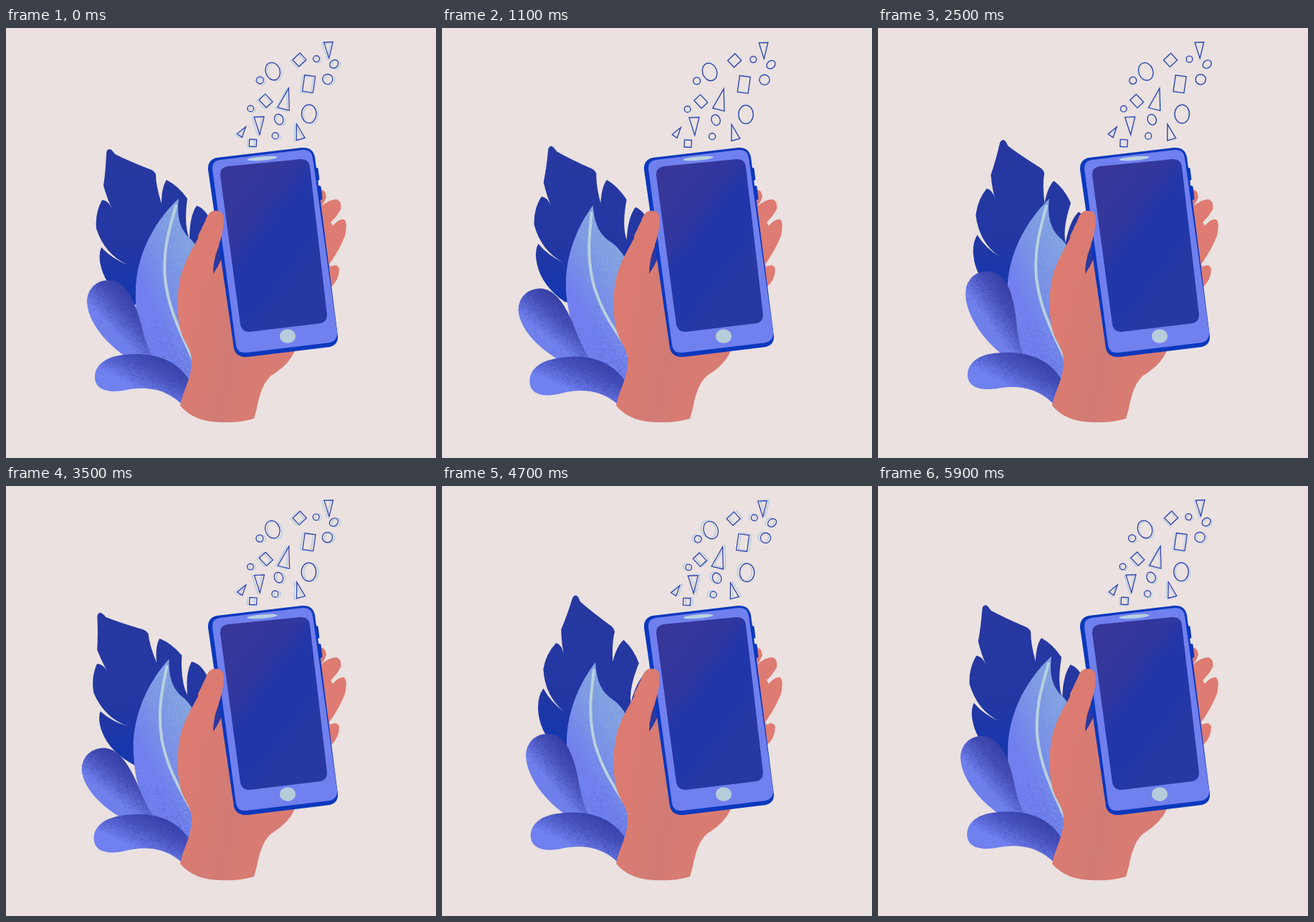
Write an HTML page that moves like this. It is 600x600 px and loops after 6 s.

```html
<!DOCTYPE html>
<html lang="en">
<head>
<meta charset="utf-8">
<title>Hand with phone</title>
<style>
  html, body { margin: 0; width: 100%; height: 100%; overflow: hidden; background: #eae1e0; }
  svg { display: block; width: 100vw; height: 100vh; }
</style>
</head>
<body>
<svg viewBox="0 0 600 600">
  <defs>
    <linearGradient id="darkFill" gradientUnits="userSpaceOnUse" x1="185" y1="180" x2="205" y2="390">
      <stop stop-color="#2738a0"/><stop offset=".6" stop-color="#2337a3"/><stop offset="1" stop-color="#1037b3"/>
    </linearGradient>
    <linearGradient id="bladeFill" gradientUnits="userSpaceOnUse" x1="262" y1="330" x2="192" y2="360">
      <stop stop-color="#7f9fe1"/><stop offset=".5" stop-color="#7991e6"/><stop offset="1" stop-color="#7180ee"/>
    </linearGradient>
    <linearGradient id="bulbFill" gradientUnits="userSpaceOnUse" x1="172" y1="370" x2="122" y2="417">
      <stop stop-color="#3840a6"/><stop offset=".3" stop-color="#4650b8"/><stop offset=".75" stop-color="#6f7fec"/>
    </linearGradient>
    <linearGradient id="budFill" gradientUnits="userSpaceOnUse" x1="208" y1="452" x2="175" y2="515">
      <stop stop-color="#3741a8"/><stop offset=".35" stop-color="#4853bd"/><stop offset=".8" stop-color="#6f80ef"/>
    </linearGradient>
    <linearGradient id="skin" gradientUnits="userSpaceOnUse" x1="240" y1="400" x2="350" y2="420">
      <stop stop-color="#dd7b71"/><stop offset=".35" stop-color="#d97b72"/><stop offset=".75" stop-color="#d17b75"/><stop offset="1" stop-color="#d87b72"/>
    </linearGradient>
    <linearGradient id="screen" gradientUnits="userSpaceOnUse" x1="300" y1="230" x2="430" y2="330">
      <stop stop-color="#37379a"/><stop offset=".35" stop-color="#30379e"/><stop offset=".52" stop-color="#2236a8"/><stop offset=".75" stop-color="#1f37aa"/><stop offset="1" stop-color="#2738a2"/>
    </linearGradient>
    <clipPath id="bladeClip"><use href="#bladeShape"/></clipPath>
    <clipPath id="bulbClip"><use href="#bulbShape"/></clipPath>
    <clipPath id="budClip"><use href="#budShape"/></clipPath>
  </defs>

  <g id="darkLeaf">
    <path fill="url(#darkFill)" d="M145 169Q140 169 140 176Q139 200 136 220Q141 238 148 252Q142 240 134 240Q124 258 126 280Q138 316 169 330Q148 322 133 306Q128 318 133 335Q141 364 174 385L270 400L300 320L285 268Q278 252 266 248Q256 262 256 294Q248 275 253 238Q240 220 224 212Q217 222 217 245Q209 220 209 204Q206 198 198 196Q170 185 152 176Q148 170 145 169Z"/>
  </g>
  <g id="blade">
    <path id="bladeShape" fill="url(#bladeFill)" d="M241 238C215 262 180 310 181 372C180 410 190 465 235 495L262 505L290 430C285 340 270 305 256 293C242 280 238 262 241 238Z"/>
    <g id="bladeGrain" clip-path="url(#bladeClip)"/>
    <path fill="none" stroke="#b9d0df" stroke-width="4" stroke-linecap="round" d="M237 248C231 272 218 304 222 350C226 385 236 410 262 465"/>
  </g>
  <g id="bulb">
    <path id="bulbShape" fill="url(#bulbFill)" d="M113 383C113 365 125 352 143 352C165 352 176 375 183 395C190 415 193 440 207 464L188 470C155 456 115 418 113 383Z"/>
    <g id="bulbGrain" clip-path="url(#bulbClip)"/>
  </g>
  <g id="bud">
    <path id="budShape" fill="url(#budFill)" d="M124 487C124 470 140 458 165 456C215 450 250 470 262 505L250 530C225 502 195 500 168 505C145 510 124 506 124 487Z"/>
    <g id="budGrain" clip-path="url(#budClip)"/>
  </g>

  <path fill="#de7b72" d="M436 225Q446 224 447 236Q445 242 440 249Q451 239 461 239Q469 242 467 253Q461 264 453 271L456 276Q464 266 472 267Q477 273 473 290Q466 308 451 330L453 333Q462 328 465 336Q465 352 452 363L425 330Z"/>
  <path fill="url(#skin)" d="M292 255Q283 255 279 267C273 292 252 315 244 345C238 370 238 398 243 420C248 440 259 447 259 465C259 490 247 505 243 527Q258 545 285 549Q320 553 346 545Q350 532 352 521Q358 495 370 485Q398 468 405 445L340 340L301 318Q303 262 303 264Q300 255 292 255Z"/>
  <path fill="#2a389f" d="M301 296Q289 318 289 343Q298 330 303 316Z"/>

  <g fill="#0b38bd">
    <rect x="431.5" y="195" width="5" height="18" rx="2" transform="rotate(-7 434 204)"/>
    <rect x="435.5" y="220" width="5" height="20" rx="2" transform="rotate(-7 438 230)"/>
    <path d="M282 198Q281 184 294 181L413 167Q428 166 431 180L463 430Q464 442 452 445L337 459Q321 460 318 447Z"/>
  </g>
  <path fill="#7080ee" d="M288 197Q287 186 298 184L414 170Q426 169 428 181L462 424Q463 436 452 439L335 453Q323 454 321 443Z"/>
  <path fill="url(#screen)" d="M299 206Q298 195 309 193L411 183Q423 183 424 194L448 400Q448 410 439 412L340 424Q329 424 327 414Z"/>
  <ellipse cx="357.5" cy="182" rx="21" ry="2.8" fill="#b8d0e0" transform="rotate(-5 357.5 182)"/>
  <ellipse cx="393" cy="430" rx="11" ry="9.8" fill="#b6cddb"/>
  <path fill="#db7b72" d="M292 255Q303 254 304 266Q303 290 295 307Q289 318 289 335L270 330L268 290L279 267Q283 255 292 255Z"/>

  <g id="pale" fill="none" stroke="#b7d0e3" stroke-width="1.5"/>
  <g id="ink" fill="none" stroke="#2a3aaa" stroke-width="1.2"/>
</svg>
<script>
const $ = id => document.getElementById(id);
const PERIOD = 3000, STEP = 100;

function add(parent, tag, attrs = {}) {
  const el = document.createElementNS("http://www.w3.org/2000/svg", tag);
  for (const key in attrs) el.setAttribute(key, attrs[key]);
  return parent.appendChild(el);
}

let seed = 7;
const random = () => (seed = seed * 16807 % 2147483647) / 2147483647;

// Speckles that thin out from (x1, y1) towards (x2, y2)
function grain(name, count, color, x1, y1, x2, y2) {
  const box = $(name + "Shape").getBBox(), dx = x2 - x1, dy = y2 - y1;
  let d = "";
  for (let i = 0; i < count; i++) {
    const x = box.x + random() * box.width, y = box.y + random() * box.height;
    const along = ((x - x1) * dx + (y - y1) * dy) / (dx * dx + dy * dy);
    if (random() > along) d += `M${x.toFixed(1)} ${y.toFixed(1)}h.9`;
  }
  add($(name + "Grain"), "path", { d, stroke: color, "stroke-width": .9, "stroke-opacity": .55 });
}
grain("blade", 9000, "#93b2e2", 258, 330, 205, 350);
grain("blade", 9000, "#4d5bbd", 205, 500, 225, 390);
grain("bulb", 5000, "#343da3", 172, 370, 130, 410);
grain("bud", 5000, "#353fab", 208, 452, 180, 505);

// Every piece is drawn around its own centre, as an ink line over a pale echo
const confetti = [];
function piece(tag, attrs, x, y, tilt, side) {
  const place = `translate(${x} ${y}) rotate(${tilt})`;
  const [pale, ink] = ["pale", "ink"].map(layer => {
    const group = add($(layer), "g");
    add(group, tag, { ...attrs, transform: place });
    return group;
  });
  confetti.push({ pale, ink, side });
}
const oval = (x, y, r, tilt) => piece("ellipse", { rx: r * .8, ry: r }, x, y, tilt, -1);
const ring = (x, y, r) => piece("circle", { r }, x, y, 0, -1);
const box = (x, y, width, height, tilt) =>
  piece("rect", { x: -width / 2, y: -height / 2, width, height }, x, y, tilt, 1);
const spike = (x, y, size, tilt) =>
  piece("path", { d: `M0 ${-size / 2}l${size * .28} ${size}h${-size * .56}z` }, x, y, tilt, 1);

oval(373.5, 61, 12.5, -20);
oval(459, 50.8, 6.5, 50);
oval(382, 128, 7.5, -22);
oval(424, 120.3, 12.8, 0);
ring(355.5, 73.5, 5);
ring(434.3, 43.7, 4.4);
ring(450, 72, 7.1);
ring(342.5, 113, 4.3);
ring(377, 151, 4.5);
box(408.2, 45, 13, 14, 47);
box(421.3, 78.5, 15, 23, 8);
box(361.3, 102.2, 15, 12, 47);
box(343.2, 161, 10, 10, 3);
spike(449, 31.5, 22.5, 178);
spike(389.5, 99, 30, 14);
spike(352.3, 137, 25, 178);
spike(407, 145, 22, -15);
spike(329, 144.5, 15, 35);

const turn = (id, angle, x, y) => $(id).setAttribute("transform", `rotate(${angle} ${x} ${y})`);
const shift = (el, x, y) => el.setAttribute("transform", `translate(${x} ${y})`);

function draw(now) {
  const time = Math.floor(now / STEP) * STEP;
  const phase = time / PERIOD * 2 * Math.PI;
  const c = Math.cos(phase), s = Math.sin(phase);
  turn("darkLeaf", 5.8 * (1 - c) - 9 * s, 228, 327);
  turn("blade", 5.3 * (c - 1) - 2.2 * s, 277, 408);
  turn("bulb", -9.4 * s, 235, 440);
  turn("bud", -2.6 * (Math.sin(phase - .3) + .3), 250, 520);
  const x = 1.7 * Math.cos(phase - .7), y = -.6 * c;
  for (const { pale, ink, side } of confetti) {
    shift(ink, side * x, y);
    shift(pale, -side * x, -y);
  }
}

const start = performance.now();
function tick() {
  draw(performance.now() - start);
  requestAnimationFrame(tick);
}
tick();
</script>
</body>
</html>
```
